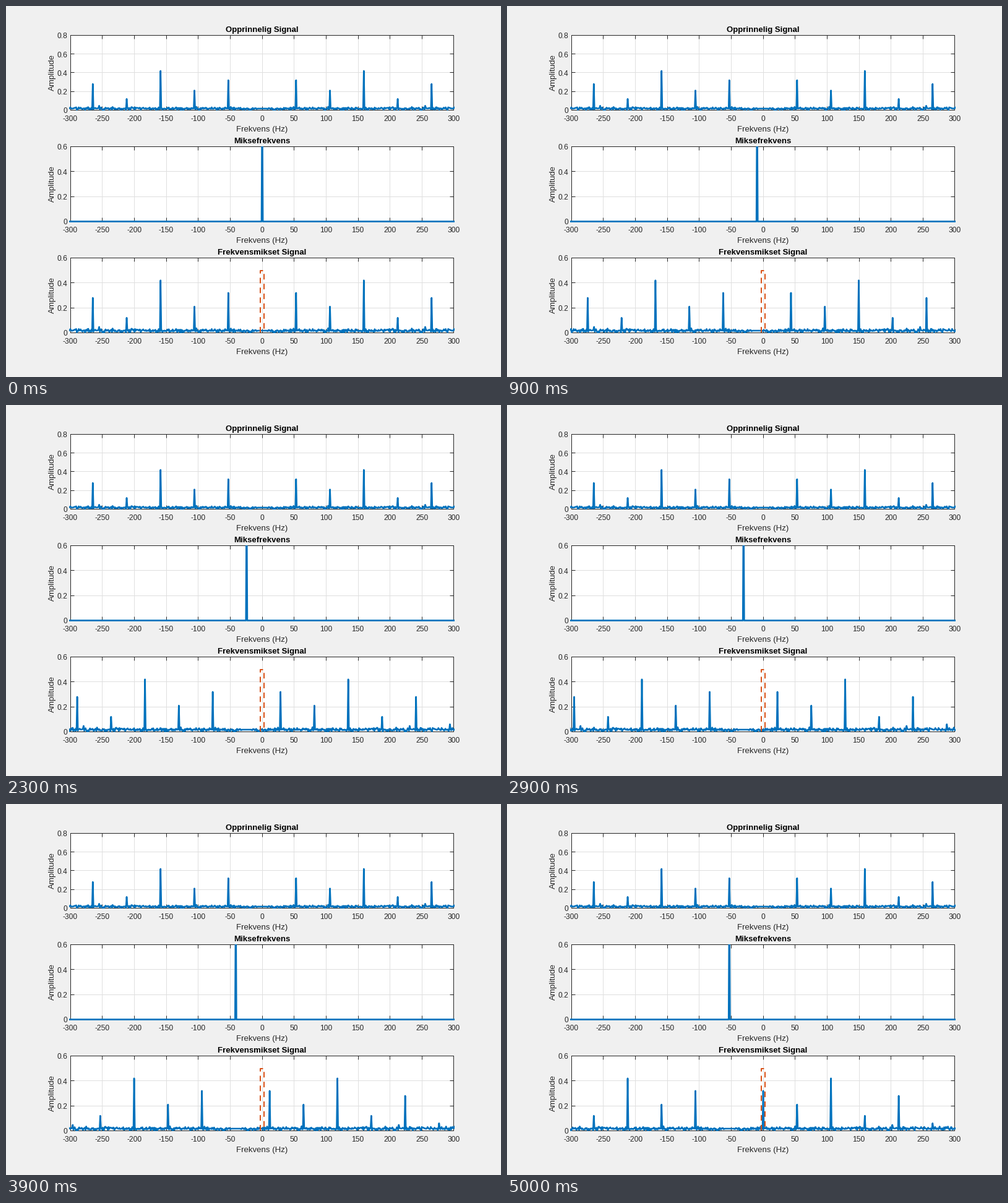
A matplotlib script for the animation above (7200 ms loop, 800x600 px).

```python
import numpy as np
import matplotlib.pyplot as plt
from matplotlib.animation import FuncAnimation
from matplotlib.transforms import Affine2D, Bbox, TransformedBbox

W, H, DPI = 800, 600, 100
PX = 72 / DPI
LEFT, RIGHT, PANEL_H = 104.1, 723.99, 121
HALF = 0.5  # frame and grid snap half a pixel up and left of the data
INK, BLUE, ORANGE = "#262626", "#0072BD", "#D95319"

FRAMES, INTERVAL = 72, 100
SWEEP_FRAMES = 50
BASE_FREQ = 53
HARMONICS = (0.32, 0.21, 0.42, 0.12, 0.28)

plt.rcParams["font.family"] = "Liberation Sans"
fig = plt.figure(figsize=(W / DPI, H / DPI), dpi=DPI, facecolor="#F0F0F0")


def label(x, y, text, size=13.2, **style):
    """Place text with its baseline at a pixel position from the top left."""
    style = {"ha": "center", "va": "baseline", "color": INK, **style}
    fig.text(x / W, 1 - y / H, text, fontsize=size * PX, **style)


def make_panel(top, title, y_max):
    bottom = top + PANEL_H
    ax = fig.add_axes([(LEFT - HALF) / W, 1 - (bottom - HALF) / H,
                       (RIGHT - LEFT) / W, PANEL_H / H])
    ax.set(xlim=(-300, 300), ylim=(0, y_max))
    x_ticks = np.arange(-300, 301, 50)
    y_ticks = np.arange(0, y_max + 0.01, 0.2)
    ax.set_xticks(x_ticks)
    ax.set_yticks(y_ticks)
    ax.set_axisbelow(True)
    ax.grid(color="#DFDFDF", linewidth=PX)
    ax.tick_params(direction="in", length=6.2 * PX, width=PX, color=INK,
                   top=True, right=True, labelbottom=False, labelleft=False)
    for spine in ax.spines.values():
        spine.set(linewidth=PX, edgecolor=INK)

    center = (LEFT + RIGHT) / 2 - 0.2
    label(center, top - 5.5, title, weight="bold", color="black")
    label(center, bottom + 34.5, "Frekvens (Hz)")
    label(78, top + PANEL_H / 2, "Amplitude", rotation=90,
          rotation_mode="anchor")
    for tick in x_ticks:
        x = LEFT + (tick + 300) / 600 * (RIGHT - LEFT)
        label(x - 0.3, bottom + 17.7, str(tick), 12)
    for tick in y_ticks:
        y = bottom - tick / y_max * PANEL_H
        label(99.5, y + 4.8, f"{tick:.1f}" if tick else "0", 12, ha="right")
    return ax


def draw_line(ax, x, y, color=BLUE, width=2.67, **style):
    offset = Affine2D().translate(HALF, -HALF)
    line, = ax.plot(x, y, color=color, linewidth=width * PX, zorder=3,
                    transform=ax.transData + offset, **style)
    # Strokes keep their full width on every edge but the top.
    box = ax.get_position()
    padded = Bbox.from_extents(box.x0 - 2 / W, box.y0 - 2 / H,
                               box.x1 + 2 / W, box.y1)
    line.set_clip_box(TransformedBbox(padded, fig.transFigure))
    return line


def make_spectrum():
    rng = np.random.default_rng(7)
    half = np.clip(rng.normal(0.018, 0.008, 401), 0.004, 0.04)
    half[:8] = 0.017
    half[255], half[318] = 0.047, 0.06
    for k, amplitude in enumerate(HARMONICS, start=1):
        half[k * BASE_FREQ] = amplitude
    return np.concatenate([half[:0:-1], half])


freq = np.arange(-400, 401)
spectrum = make_spectrum()
impulse = np.where(freq == 0, 1.0, 0.0)

source_ax = make_panel(47.48, "Opprinnelig Signal", 0.8)
mixer_ax = make_panel(227.48, "Miksefrekvens", 0.6)
mixed_ax = make_panel(407.48, "Frekvensmikset Signal", 0.6)

draw_line(source_ax, freq, spectrum)
mixer_line = draw_line(mixer_ax, freq, impulse)
mixed_line = draw_line(mixed_ax, freq, spectrum)
draw_line(mixed_ax, [-3, -3, 3, 3], [0, 0.5, 0.5, 0], ORANGE, 2,
          linestyle=(0, (4.5, 3.45)), dash_capstyle="butt")


def update(frame):
    shift = BASE_FREQ * min(frame / SWEEP_FRAMES, 1)
    mixer_line.set_xdata(freq - shift)
    mixed_line.set_xdata(freq - shift)
    return mixer_line, mixed_line


anim = FuncAnimation(fig, update, frames=FRAMES, interval=INTERVAL,
                     repeat=True, repeat_delay=0)
plt.show()
```
